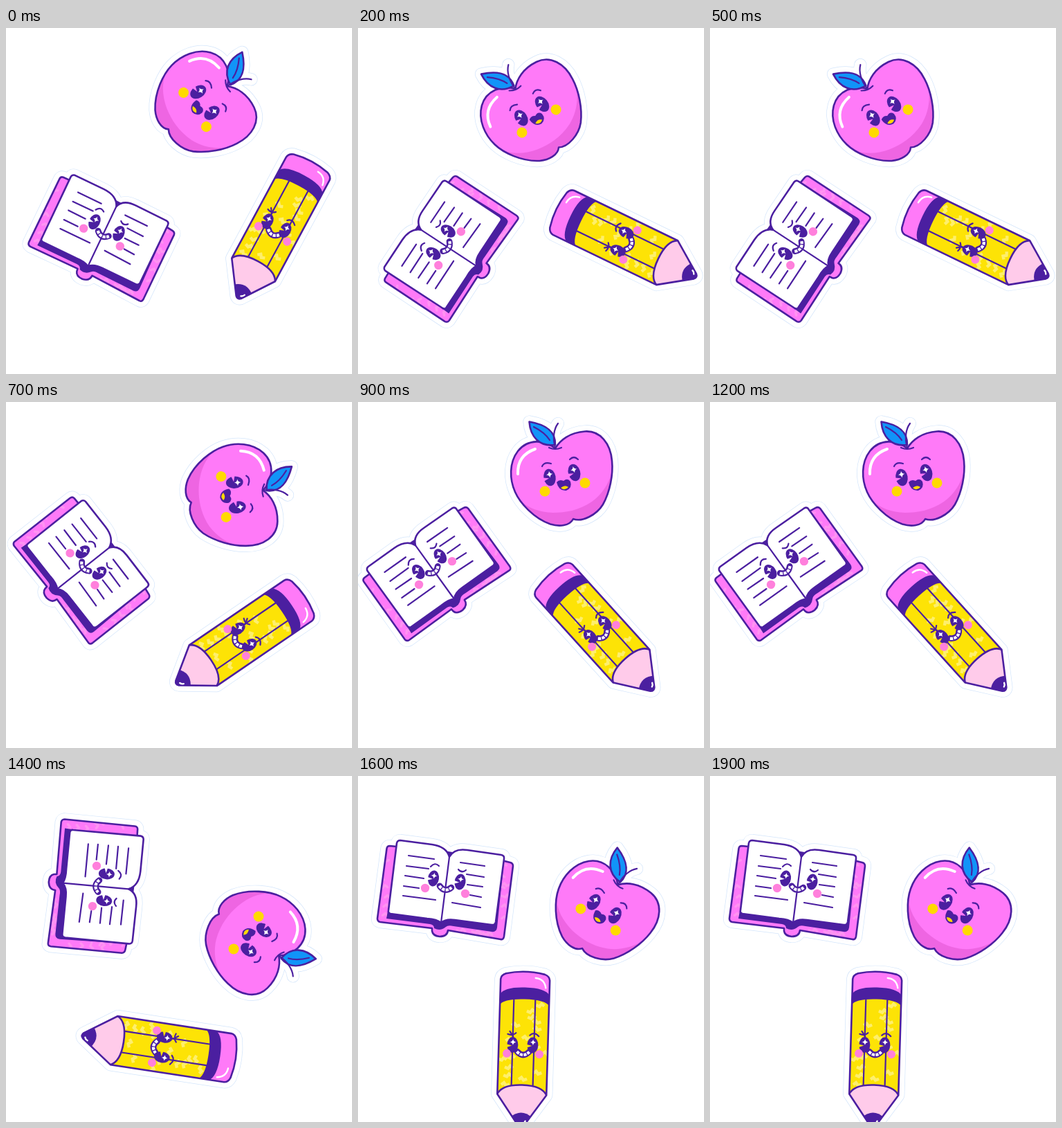
An HTML page that plays this animation: 500x500 px, repeating every 2.1 s.

```html
<!DOCTYPE html>
<html lang="en">
<head>
<meta charset="utf-8">
<title>School stickers</title>
<style>
  html, body { margin: 0; width: 100%; height: 100%; overflow: hidden; background: #fff; }
  svg { display: block; width: 100vw; height: 100vh; }
  .edge { fill: #d3e5fb; stroke: #d3e5fb; stroke-width: 18.2; }
  .rim { fill: #fff; stroke: #fff; stroke-width: 16.8; }
  .ink { stroke: #4b1fa0; stroke-width: 2.6; }
  .line { fill: none; stroke: #4b1fa0; stroke-width: 2.2; }
  .dark { fill: #4b1fa0; }
  .pink { fill: #ff7af8; }
  .shine { fill: none; stroke: #fff; stroke-width: 4; }
  .thin { stroke-width: 2.4; }
  .blush { fill: #ff80dc; }
  .sun { fill: #ffd900; }
  #apple { --skin: #ff7af8; }
  #book { --skin: #fff; }
  #pencil { --skin: #fde306; }
</style>
</head>
<body>
<svg viewBox="0 0 500 500" stroke-linecap="round" stroke-linejoin="round">
  <defs>
    <g id="eye">
      <ellipse class="dark" rx="8" ry="11.5"/>
      <path d="M-1 1L-9-1V4Z" style="fill: var(--skin)"/>
      <path d="M.5-8.5Q1.1-4.6 5-4Q1.1-3.4 .5.5Q-.1-3.4-4-4Q-.1-4.6 .5-8.5" fill="#fff"/>
    </g>
    <g id="grin" fill="none">
      <path d="M-8.5-3Q0 6 8.5-3" stroke="#4b1fa0" stroke-width="8.8"/>
      <path d="M-9-3Q0 6 9-3" stroke="#fff" stroke-width="4.2" stroke-linecap="butt" stroke-dasharray="4.2 1.4"/>
    </g>

    <path id="appleBody" d="M285 67C270 54 245 53 231 71C218 88 219 112 227 130C234 146 254 168 278 176.5C291 180.5 306 179 311 169C324 174 345 163 354 148C364 130 369 105 367 85C365 60 350 41 328 42.5C306 44 292 55 285 67Z"/>
    <path id="leaf" d="M285 62C262 65 249 50 247.5 28.5C268 32 286 40 285 62Z"/>
    <path id="stem" d="M285 66C281 52 283 39 289 31"/>
    <g id="appleShape">
      <use href="#appleBody"/><use href="#leaf"/><use href="#stem"/>
    </g>
    <clipPath id="appleClip"><use href="#appleBody"/></clipPath>

    <path id="cover" d="M56 102L46 101Q42 101 41.5 105L28 206Q28 210 32 211L107 220V224Q108 231 118 232Q129 232 130 223L206 236Q210 237 211 232L224 130Q224 126 220 125L208 122Z"/>
    <path id="pages" d="M61 93L107 99Q128 102 132 117Q139 104 158 107L207 114Q212 115 211 120L199 211Q198 216 193 215L140 208Q127 206 120 212Q114 207 100 206L47 199Q43 198 44 194L56 97Q57 93 61 93Z"/>
    <g id="bookShape"><use href="#cover"/><use href="#pages"/></g>
    <clipPath id="coverClip"><use href="#cover"/></clipPath>

    <path id="pencilShape" d="M-35.5 59V-107Q-35-113-28-115.5Q0-122 28-115.5Q35-113 35.5-107V59L4 104Q0 108-4 104Z"/>
    <clipPath id="pencilClip"><use href="#pencilShape"/></clipPath>
  </defs>

  <g id="apple">
    <use href="#appleShape" class="edge"/>
    <use href="#appleShape" class="rim"/>
    <g clip-path="url(#appleClip)">
      <use href="#appleBody" fill="#ee65e2"/>
      <path class="pink" d="M200 20H380V100H367C363 118 352 134 338 144C318 157 300 160 282 160C262 159 247 154 234 142H200Z"/>
    </g>
    <use href="#appleBody" class="ink" fill="none"/>
    <use href="#leaf" class="ink" fill="#1194f8"/>
    <path class="line" d="M254 36Q270 44 277 55M276 66Q285 70 294 66"/>
    <use href="#stem" class="line"/>
    <path class="shine" d="M231 104Q230 77 256 68"/>
    <path class="line" d="M266 93Q269 86 279 89M306 83Q312 77 318 83"/>
    <use href="#eye" transform="translate(277 109) rotate(-10) scale(1.08)"/>
    <use href="#eye" transform="translate(312.5 102) rotate(-16) scale(1.08)"/>
    <path class="dark" d="M287 116Q291 111 297 114Q303 109 307 115Q310 124 301 128Q290 129 287 116Z"/>
    <path class="sun" d="M293 124Q299 119 304 123Q299 129 293 124Z"/>
    <circle class="sun" cx="270" cy="129" r="7.5"/>
    <circle class="sun" cx="328" cy="117" r="7.5"/>
  </g>

  <g id="book">
    <use href="#bookShape" class="edge"/>
    <use href="#bookShape" class="rim"/>
    <use href="#cover" class="pink"/>
    <path id="coverFlecks" clip-path="url(#coverClip)" fill="none" stroke="#ff93f2" stroke-width="3.4"/>
    <use href="#cover" class="ink" fill="none"/>
    <path class="dark" d="M56 97L44 190L41 206L104 214Q110 215 110 220Q119 225 127 218Q130 215 138 217L193 225Q200 226 201 219L211 122Z"/>
    <use href="#pages" class="ink" fill="#fff"/>
    <path class="line" d="M132 117L120 212M73 115L110 120M70 130L102 134M68 144L95 148M66 159L88 162M65 173L112 179M148 125L183 130M157 142L182 146M158 157L180 160M162 172L178 175M136 183L177 190"/>
    <path class="line" d="M105 131Q111 124 117 130M145 135Q150 141 156 136"/>
    <use href="#eye" transform="translate(109 148) rotate(8)"/>
    <use href="#eye" transform="translate(147.5 153) rotate(8)"/>
    <use href="#grin" transform="translate(126 163) rotate(8)"/>
    <circle class="blush" cx="97" cy="162" r="6.2"/>
    <circle class="blush" cx="155" cy="170" r="6.2"/>
  </g>

  <g id="pencil">
    <use href="#pencilShape" class="edge"/>
    <use href="#pencilShape" class="rim"/>
    <g clip-path="url(#pencilClip)">
      <use href="#pencilShape" fill="#fde306"/>
      <path id="woodFlecks" fill="none" stroke="#feef6c" stroke-width="4.4" stroke-linecap="butt" stroke-linejoin="miter"/>
      <path class="line" d="M-15.5-78V47M15.5-78V47"/>
      <path class="pink" d="M-40-125H40V-80H-40Z"/>
      <path class="dark" d="M-36-85Q-30-96 0-96Q30-96 36-85V-70Q30-79 0-79Q-30-79-36-70Z"/>
      <path class="ink" fill="#ffcbea" d="M-36 60Q-30 45 0 45Q30 45 36 60V125H-36Z"/>
      <path class="dark" d="M-16 92Q0 78 16 92V125H-16Z"/>
    </g>
    <use href="#pencilShape" class="ink" fill="none"/>
    <path class="shine thin" d="M15-110Q28-109 30-96M2 101Q5 100 6 97"/>
    <path class="line" d="M-23-28Q-16-25-11-30M-20-32L-15-25M9-27Q15-33 22-26"/>
    <use href="#eye" transform="translate(-15.5 -12.5)"/>
    <use href="#eye" transform="translate(13.5 -13)"/>
    <use href="#grin"/>
    <circle class="blush" cx="-23.5" cy="0" r="6"/>
    <circle class="blush" cx="23.5" cy="0" r="6"/>
  </g>
</svg>
<script>
const $ = id => document.getElementById(id);

// Each pose: x, y, angle of the point between the cheeks.
const stickers = [
  { el: $('apple'), home: [299, 123, -11.7], poses: [
    [273, 118, 56.3], [261.5, 134.5, -34], [314.5, 137, 83],
    [299, 123, -11.7], [347, 226.5, 127.4], [347, 207.5, 31.8]] },
  { el: $('book'), home: [126, 166, 7.7], poses: [
    [138.5, 302.5, 25.9], [132.5, 318.5, -56.3], [110.5, 241.5, 52],
    [112, 247, -35.3], [128, 159, 95.7], [126, 166, 7.7]] },
  { el: $('pencil'), home: [0, 0, 0], poses: [
    [385.5, 297.5, 28.3], [393.5, 313.5, -64.2], [333.5, 347.5, 55.7],
    [355.5, 338, -42.2], [214.5, 391, 98.7], [238.5, 401.5, 1.7]] }
];

let seed = 7;
const random = () => (seed = seed * 16807 % 2147483647) / 2147483647;

function flecks(count, x, y, w, h) {
  let d = '';
  for (let i = 0; i < count; i++) {
    const side = random() < 0.5 ? -1 : 1;
    const px = x + w * random(), py = y + h * (i + random()) / count;
    d += `M${px} ${py}l${4 * side} -3l${3 * side} 4l${5 * side} -2`;
  }
  return d;
}
$('woodFlecks').setAttribute('d', flecks(17, -34, -72, 68, 122));
$('coverFlecks').setAttribute('d',
  flecks(8, 30, 105, 14, 100) + flecks(9, 206, 125, 14, 105) + flecks(6, 140, 224, 60, 8));

// Three beats of 700 ms, each a short pose followed by a long one.
function draw() {
  const t = performance.now() % 2100;
  const step = 2 * Math.floor(t / 700) + (t % 700 >= 200 ? 1 : 0);
  for (const { el, home, poses } of stickers) {
    const [x, y, angle] = poses[step];
    el.setAttribute('transform',
      `translate(${x} ${y}) rotate(${angle - home[2]}) translate(${-home[0]} ${-home[1]})`);
  }
  requestAnimationFrame(draw);
}
draw();
</script>
</body>
</html>
```
